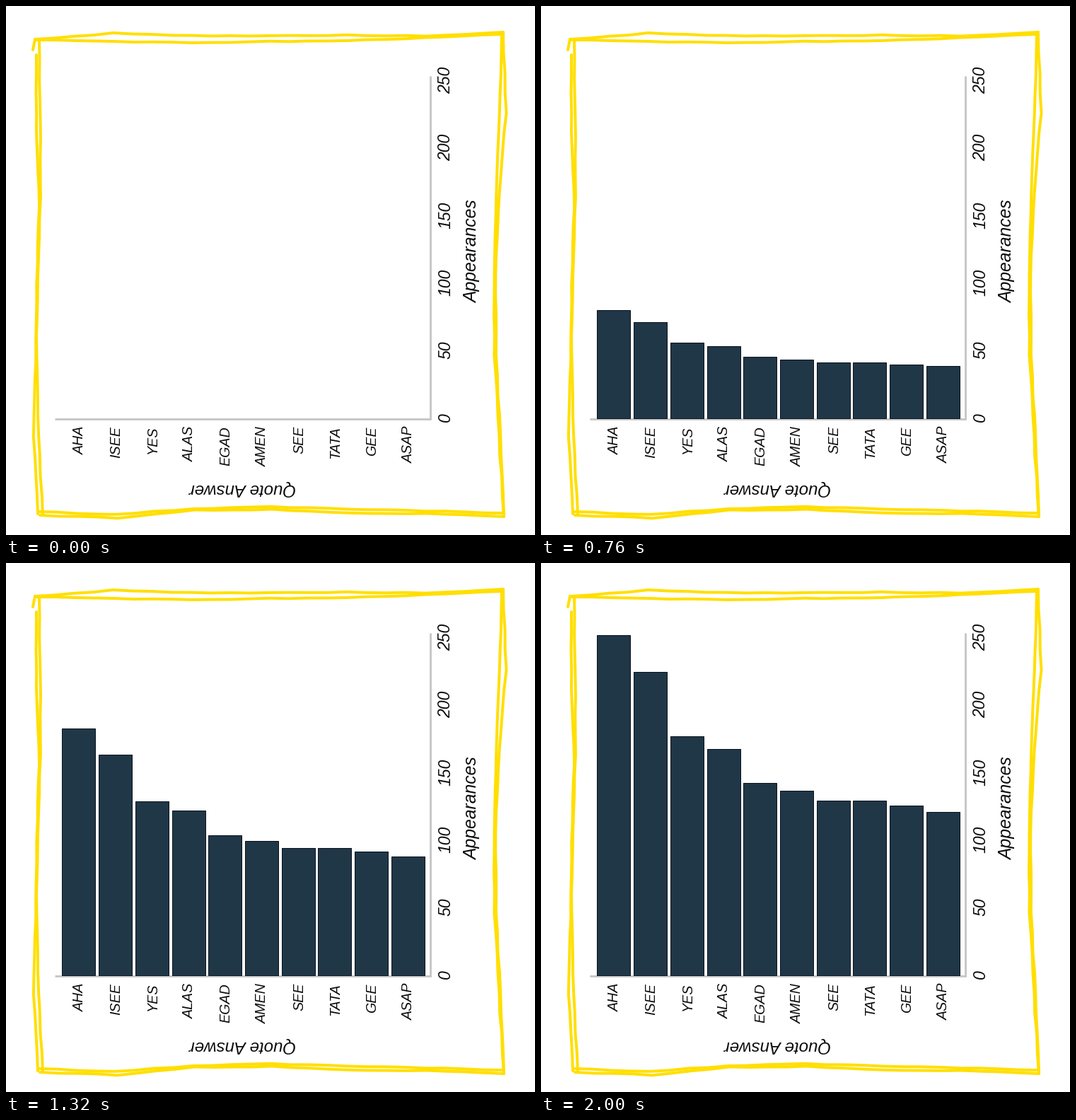
Animation, 748 px wide and 748 px high, one loop 4960 ms. Source, as a matplotlib script:

```python
import numpy as np
import matplotlib.pyplot as plt
from matplotlib.animation import FuncAnimation
from matplotlib.patches import Rectangle

SIZE, DPI = 748, 88
STEP, LOOP = 40, 4960
START, RISE = 10, 2000
PX = 72 / DPI
BASE, LEFT, PITCH, WIDTH = 582.5, 79.5, 51.67, 47
YELLOW, GREY, NAVY = "#ffdf00", "#c8c8c8", "#203748"

fig = plt.figure(figsize=(SIZE / DPI, SIZE / DPI), dpi=DPI, facecolor="white")
ax = fig.add_axes([0, 0, 1, 1])
ax.set_xlim(0, SIZE)
ax.set_ylim(SIZE, 0)
ax.axis("off")
rng = np.random.default_rng(4)


def pen(x, y, color=YELLOW, width=4, cap="round"):
    ax.plot(x, y, color=color, lw=width * PX, solid_capstyle=cap,
            solid_joinstyle="round", zorder=1)


def sketch(start, end, *bends, upright=False):
    """Pen line whose sideways position follows evenly spaced bends."""
    along = np.linspace(start, end, 25)
    side = np.interp(along, np.linspace(start, end, len(bends)), bends)
    side[1:-1] += rng.uniform(-0.6, 0.6, len(side) - 2)
    pen(*((side, along) if upright else (along, side)))


def label(x, y, text, size, angle=90, ha="center"):
    ax.text(x, y, text, fontsize=size * PX, family="Liberation Sans",
            style="italic", rotation=angle, rotation_mode="anchor",
            ha=ha, va="baseline", color="#0c0c0c", zorder=4)


# border: two passes per side
pen([38, 41], [62, 47])
sketch(41, 703, 47, 38.5, 42, 42, 41, 42.5, 37)
sketch(43, 702, 48, 50, 52, 50, 49, 45, 40)
sketch(45, 703, 715, 719, 711, 708, 711, 714, 717)
sketch(48, 704, 720, 724, 713, 712, 717, 718, 722)
sketch(69, 718, 43, 43, 47, 43.5, 42, 39, 45, upright=True)
sketch(47, 720, 47, 48.5, 48.5, 45, 43, 46, 52, upright=True)
sketch(37, 722, 703, 707, 697, 692, 693, 699, 704, upright=True)
sketch(38, 722, 701, 698, 693, 690, 691, 697, 704, upright=True)

# axes
pen([69, 601.5], [583.5, 583.5], GREY, 3, "butt")
pen([600.2, 600.2], [99, 585], GREY, 3, "butt")
for value in range(0, 251, 50):
    label(628, 582 - 1.91 * value, str(value), 23)
label(666, 347.5, "Appearances", 24.8)
label(334.5, 676, "Quote Answer", 24, angle=180)

HEIGHTS = {"AHA": 481, "ISEE": 429, "YES": 338, "ALAS": 320, "EGAD": 272,
           "AMEN": 261, "SEE": 247, "TATA": 247, "GEE": 240, "ASAP": 231}

bars = []
for i, name in enumerate(HEIGHTS):
    label(110 + PITCH * i, 594, name, 19.6, ha="right")
    bar = Rectangle((LEFT + PITCH * i, BASE), WIDTH, 0, facecolor=NAVY,
                    edgecolor="#0a141c", lw=PX, zorder=3)
    bars.append(ax.add_patch(bar))


def ease(t):
    u = np.clip((t - START) / RISE, 0, 1)
    return u * u * (3 - 2 * u)


def draw(n):
    k = ease(n * STEP)
    for bar, height in zip(bars, HEIGHTS.values()):
        bar.set_y(BASE - height * k)
        bar.set_height(height * k)
        bar.set_visible(n > 1)
    return bars


anim = FuncAnimation(fig, draw, frames=LOOP // STEP, interval=STEP,
                     repeat=True, repeat_delay=0, blit=False)
plt.show()
```
